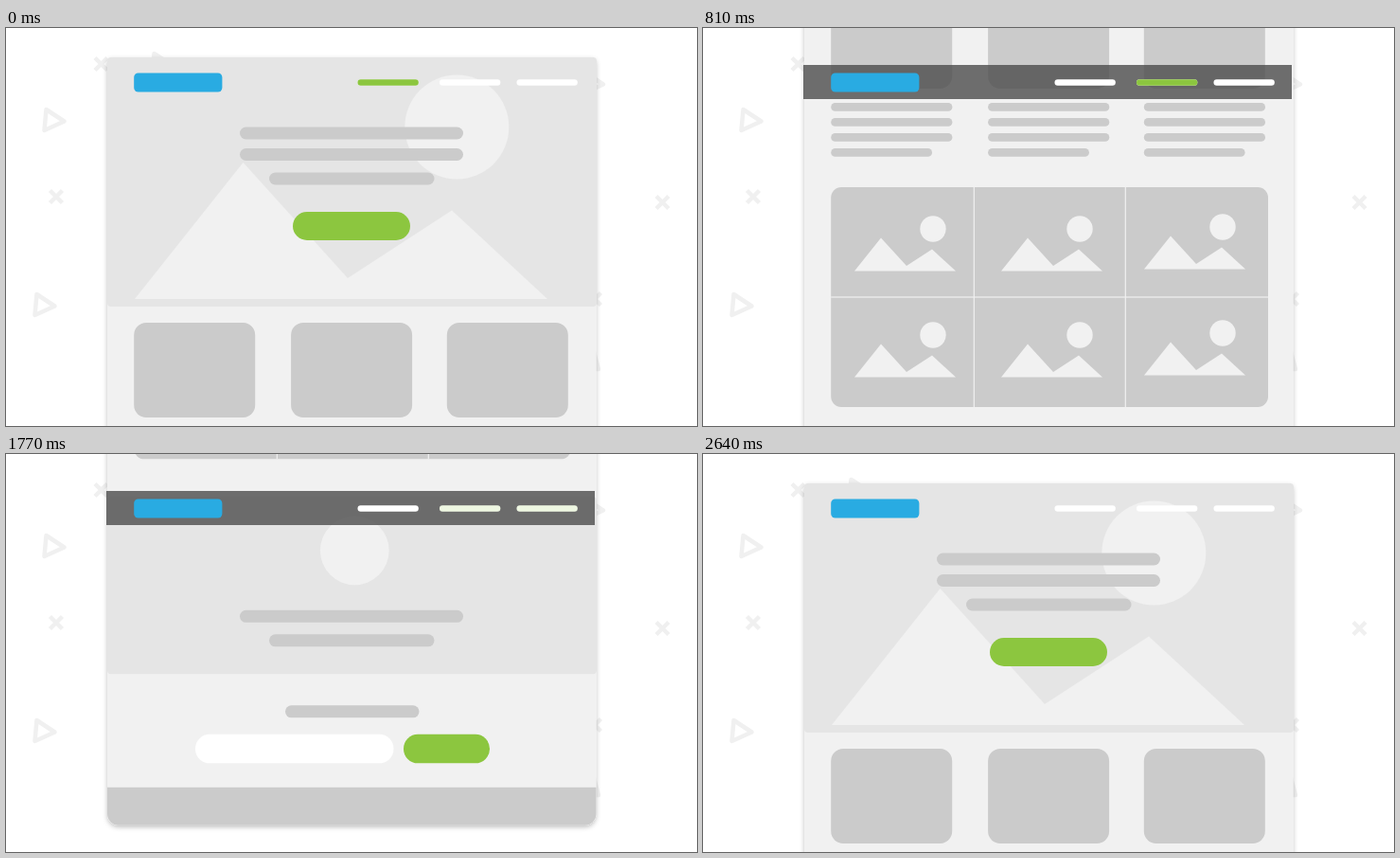
Recreate the animation shown at these times as an HTML page. Size 730 by 420 pixels, loop 2.7 s.

```html
<!DOCTYPE html>
<html lang="en">
<head>
<meta charset="utf-8">
<title>Scrolling page</title>
<style>
  html, body { margin: 0; width: 100%; height: 100%; overflow: hidden; background: #fff; }
  svg { display: block; width: 730px; height: 420px; }
</style>
</head>
<body>
<svg viewBox="0 0 730 420">
  <defs>
    <filter id="shadow" filterUnits="userSpaceOnUse" x="90" y="10" width="550" height="1150">
      <feDropShadow dx="0" dy="2" stdDeviation="2.5" flood-color="#000" flood-opacity=".25"/>
    </filter>
  </defs>
  <g id="backdrop" fill="none" stroke="#f0f0f0" stroke-width="4.5" stroke-linejoin="round"></g>
  <g id="page"></g>
  <g id="nav"></g>
</svg>
<script>
const LOOP = 2700, STEP = 30;
const PALE = '#f1f1f1', PANEL = '#e5e5e5', GREY = '#cbcbcb', GREEN = '#8cc63f', BLUE = '#29abe2';
const $ = id => document.getElementById(id);

function add(parent, tag, attrs) {
  const node = document.createElementNS('http://www.w3.org/2000/svg', tag);
  for (const key in attrs) node.setAttribute(key, attrs[key]);
  parent.append(node);
  return node;
}
const box = (parent, x, y, width, height, rx, fill) =>
  add(parent, 'rect', { x, y, width, height, rx, fill });
const disc = (parent, cx, cy, r) => add(parent, 'circle', { cx, cy, r, fill: PALE });
const shape = (parent, d, attrs) => add(parent, 'path', { d, ...attrs });

// Backdrop marks
const backdrop = $('backdrop');
for (const [x, y] of [[53, 178], [100.5, 38], [693.5, 184], [622, 286]])
  shape(backdrop, `M${x - 6.5} ${y - 6.5}l13 13m0 -13l-13 13`);
for (const [x, y] of [[42.5, 86], [32.5, 281], [156.5, 27], [612, 47]])
  shape(backdrop, `M${x} ${y}l19 12.5l-21 9.5z`);
shape(backdrop, 'M620 338L626 360L610 360z');

// Page
const page = $('page');
shape(page, 'M112 31H618.5a5 5 0 0 1 5 5V1121.5a12 12 0 0 1 -12 12H119a12 12 0 0 1 -12 -12V36a5 5 0 0 1 5 -5z',
  { fill: PALE, filter: 'url(#shadow)' });

box(page, 107, 31, 517, 263, 4, PANEL);
disc(page, 476.3, 104.5, 55);
shape(page, 'M136 286L250.5 142L361 264L471 192.5L572 286z', { fill: PALE });
box(page, 247, 104.5, 236, 13, 6.5, GREY);
box(page, 247, 127, 236, 13, 6.5, GREY);
box(page, 278, 152.5, 174.5, 13, 6.5, GREY);
box(page, 303, 194, 124, 30, 15, GREEN);

for (const x of [135.2, 301.1, 465.8]) {
  box(page, x, 311, 128, 100, 13, GREY);
  for (let i = 0; i < 4; i++) box(page, x, 426 + 16 * i, i < 3 ? 128.2 : 106.8, 8.8, 4.4, GREY);
}

box(page, 135.2, 515, 461.8, 232, 11, GREY);
for (const x of [286.3, 446.3]) box(page, x - .6, 515, 1.2, 232, 0, PALE);
box(page, 135.2, 630.4, 461.8, 1.2, 0, PALE);
for (const [x, y] of [[160, 603.5], [315, 603.5], [466, 601.5]]) {
  for (const rowY of [y, y + 112]) {
    shape(page, `M${x} ${rowY}l28 -35l27 29.5l27 -17.5l25 23z`, { fill: PALE });
    disc(page, x + 83, rowY - 44.5, 13.7);
  }
}

box(page, 107, 787, 517, 187, 4, PANEL);
disc(page, 368.3, 843.5, 36.4);
box(page, 247, 906.5, 236, 13, 6.5, GREY);
box(page, 278, 932, 174.5, 13, 6.5, GREY);
box(page, 295, 1007, 141.5, 13, 6.5, GREY);
box(page, 200, 1037.5, 209.5, 30.5, 15.2, '#fff');
box(page, 420, 1037.5, 91, 30.5, 15.2, GREEN);
shape(page, 'M107 1093.5H623.5V1121.5a12 12 0 0 1 -12 12H119a12 12 0 0 1 -12 -12z', { fill: GREY });

// Fixed navigation
const nav = $('nav');
const bar = box(nav, 106, 39, 516, 36, 0, '#4d4d4d');
box(nav, 135.2, 47.5, 93.2, 20, 4.5, BLUE);
const highlights = [371.5, 458, 539.5].map(x => {
  box(nav, x, 54.3, 64.3, 6.5, 3.2, '#fff');
  return box(nav, x, 54.3, 64.3, 6.5, 3.2, GREEN);
});

// Tracks: rows of [start, end, from, to]
const scrollTrack = [[175, 715, 0, 347], [1284, 1824, 347, 753], [2350, 2640, 753, 0]];
const barTrack = [[366, 716, 0, .8], [2350, 2640, .8, 0]];
const linkTracks = [
  [[580, 700, 1, 0]],
  [[690, 805, 0, 1], [1668, 1788, 1, 0]],
  [[1752, 1872, 0, 1], [2340, 2430, 1, 0]]
];
const smooth = p => p * p * (3 - 2 * p);
const linear = p => p;

function valueAt(track, t, ease) {
  let value = track[0][2];
  for (const [start, end, from, to] of track)
    if (t >= start) value = from + (to - from) * ease(Math.min(1, (t - start) / (end - start)));
  return value;
}

function draw(t) {
  page.setAttribute('transform', `translate(0 ${-valueAt(scrollTrack, t, smooth)})`);
  bar.setAttribute('opacity', valueAt(barTrack, t, smooth));
  highlights.forEach((link, i) => link.setAttribute('opacity', valueAt(linkTracks[i], t, linear)));
}

const begin = performance.now();
function tick() {
  const t = (performance.now() - begin) % LOOP;
  draw(Math.floor(t / STEP + .01) * STEP);
  requestAnimationFrame(tick);
}
tick();
</script>
</body>
</html>
```
